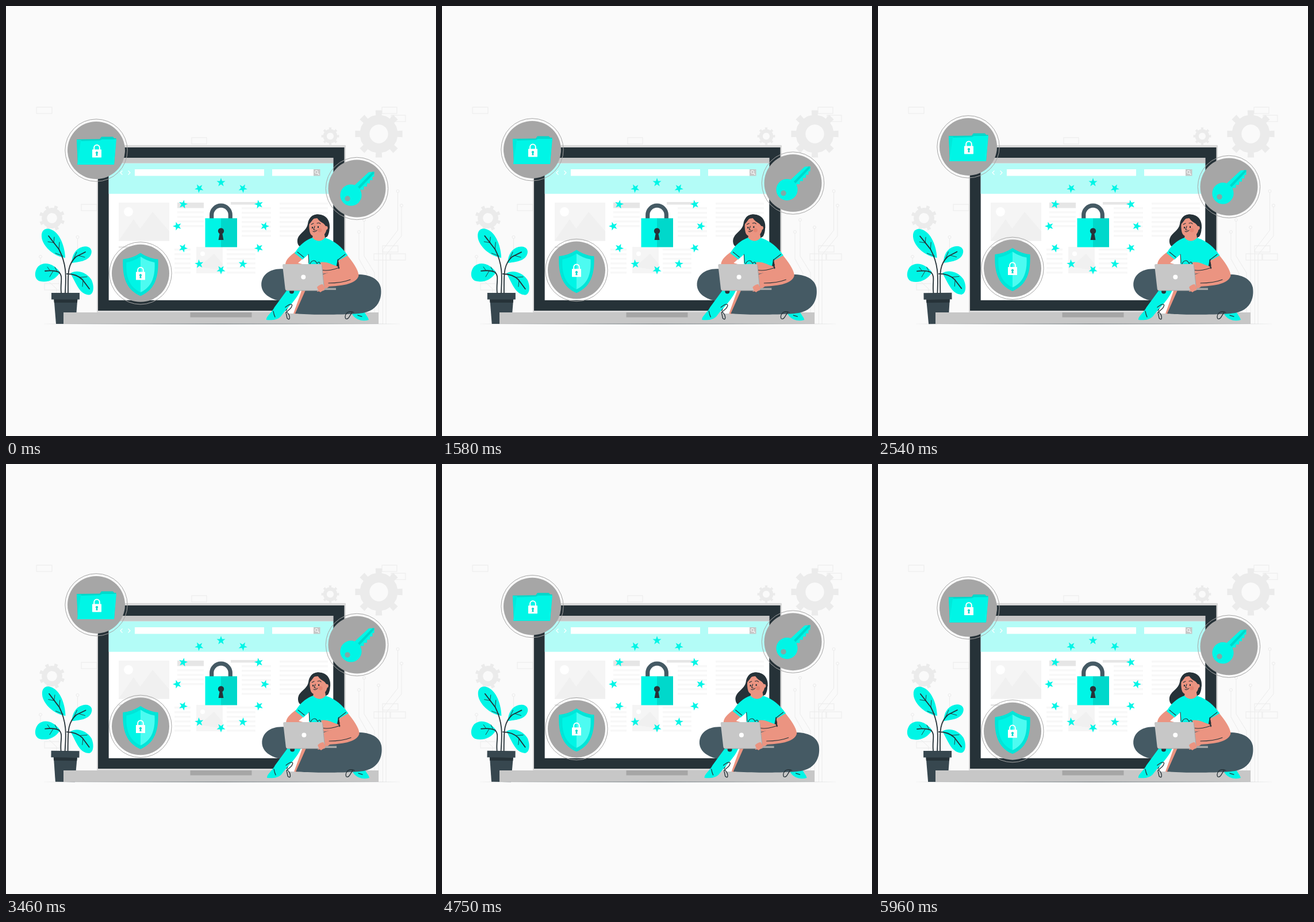
Recreate the animation shown at these times as an HTML page. Size 748x748 px, loop 6 s.

```html
<!DOCTYPE html>
<html lang="en">
<head>
<meta charset="utf-8">
<title>Data protection</title>
<style>
html, body { margin: 0; width: 100%; height: 100%; overflow: hidden; background: #fafafa; }
svg { display: block; width: 100vw; height: 100vh; }
.cy { fill: #00f5e6 } .cd { fill: #00d8cb } .dk { fill: #263238 } .sl { fill: #455a64 }
.gr { fill: #c7c7c7 } .mg { fill: #a6a6a6 } .sk { fill: #eb9481 } .wh { fill: #fff }
.ln { fill: none; stroke: #263238; stroke-linecap: round; stroke-linejoin: round }
.bg { fill: none; stroke: #ebebeb }
</style>
</head>
<body>
<svg viewBox="0 0 748 748">
  <defs>
    <g id="badge">
      <circle r="54.2" fill="none" stroke="#a6a6a6"/>
      <circle r="50" class="mg"/>
    </g>
    <g id="padlock">
      <path d="M-4.8-4V-8a4.8 4.8 0 0 1 9.6 0V-4" fill="none" stroke="#fff" stroke-width="2"/>
      <rect x="-8" y="-5" width="16" height="14" rx=".6" class="wh"/>
      <path d="M-1 2.5a2 2 0 1 1 2 0l.7 3.5h-3.4z" class="cd"/>
    </g>
  </defs>

  <g id="backdrop">
    <g id="boxes" class="bg"></g>
    <g id="gears" fill="#ebebeb" fill-rule="evenodd"></g>
    <g id="circuits" class="bg"></g>
  </g>

  <g id="plant">
    <path d="M83.500 510h40.800l-3.300 43h-34z" fill="#37474f"/>
    <rect x="79" y="499" width="49" height="11.500" fill="#37474f"/>
    <path class="dk" d="M83.300 510.500h41l-.4 5.500h-40.200z"/>
    <g class="cy">
      <path d="M103 438C86 436 67 422 62.500 405C60 393 65 387 74 387.500C91 390 102 414 103 438Z"/>
      <path d="M114 447C115 433 121 422 133 419C145 416 152 424 147.500 433C142 444 128 445 114 447Z"/>
      <path d="M94 463C86 477 71 482 58 478.500C49 475 48.500 462 56 453C67 443 84 449 94 463Z"/>
      <path d="M112 465C123 458 140 463 148.500 476C154 487 153 501 145 502.500C128 502 123 484 112 465Z"/>
    </g>
    <g class="ln" stroke-width="1.800">
      <path d="M96 499C94 481 100 470 92 463Q83 459 68 461M103 499C104 475 107 452 92 423L74 400M108 499C108 468 106 450 122 436L138 428M106 466Q123 466 133 476L145 492"/>
      <path stroke-width=".9" d="M92 423l1-12M84 412l-11-2M83 411l1-9M99 435l-13-5M118 439l5-11M126 434l11 3M77 461l-5-7M82 461l-6 10M89 462l-4-8M129 472l12-1M134 477l-1 11"/>
    </g>
  </g>

  <g id="computer">
    <rect x="158" y="242" width="433" height="291" rx="1" fill="#d9d9d9"/>
    <rect x="160" y="246" width="428.500" height="284" class="dk"/>
    <rect x="178.700" y="264" width="390.600" height="247.800" class="wh"/>
    <rect x="178.700" y="264" width="390.600" height="9.700" class="gr"/>
    <rect x="178.700" y="273.700" width="390.600" height="53" fill="#b3fcf7"/>
    <path d="M202.500 286.500l-3.500 3.500l3.500 3.500M212.500 286.500l3.500 3.500l-3.500 3.500" fill="none" stroke="#fff" stroke-width="1.200"/>
    <path class="wh" d="M224 284h225v11.500H224zM463 284h72v11.500H463z"/>
    <rect x="535" y="284" width="11.500" height="11.500" fill="#c7c7c7"/>
    <path d="M542 291l2.500 2.500" stroke="#fff" stroke-width="1.300"/>
    <circle cx="540" cy="288.800" r="2.600" fill="none" stroke="#fff"/>
    <g id="page" fill="#f8f8f8">
      <rect x="196" y="342" width="88" height="67" fill="#f5f5f5"/>
      <circle cx="213" cy="358" r="8" class="wh"/>
      <path d="M196 408L222 371L248 408zM230 392L255 358L284 392V408H215z" fill="#f0f0f0"/>
      <rect x="331" y="419" width="46" height="46" fill="#f5f5f5"/>
      <circle cx="342" cy="431" r="4" class="wh"/>
      <path d="M336 454L362 431L377 449V460z" fill="#f0f0f0"/>
      <path d="M298 342h46v9.500h-46zM391 341h48v4.500h-48zM196 418h46v3h-46z" fill="#e6e6e6"/>
    </g>
    <rect x="100" y="533" width="548" height="20" class="gr"/>
    <path d="M320.500 533h107v8.500h-107z" class="mg"/>
  </g>
  <path d="M55 553L374 552.300L695 553L374 553.700Z" fill="#8c9396"/>

  <g id="lock">
    <g id="stars" class="cy"></g>
    <path d="M357.700 370V363.500a16.300 16.300 0 0 1 32.600 0V370" fill="none" stroke="#455a64" stroke-width="7.200"/>
    <path class="cy" d="M346.500 369.300H374V419.500H346.500z"/>
    <path class="cd" d="M374 369.300H402V419.500H374z"/>
    <path class="dk" d="M371.600 396a5.200 5.200 0 1 1 4.800 0l2 11h-8.800z"/>
  </g>

  <g id="folder">
    <use href="#badge" x="157" y="251"/>
    <path class="cd" d="M123 232L163 231.500L166 227.500H186L188 230H191.500L188 276H125z"/>
    <path class="cy" d="M130 235L163 234L167 232H192L188 276H124z"/>
    <path class="cy" d="M123 233H131L125 275z" opacity=".6"/>
    <use href="#padlock" x="158" y="254.500"/>
  </g>

  <g id="shield">
    <use href="#badge" x="234" y="464.800"/>
    <path d="M234 429.500Q248 439 264.500 440.500C266 473 258 494 234 504.500C210 494 202 473 203.500 440.500Q220 439 234 429.500Z" fill="#00e5d8"/>
    <path class="cy" d="M234 436Q222 444 209.500 446C208 472 215 489 234 498Z"/>
    <path d="M234 436Q246 444 258.500 446C260 472 253 489 234 498Z" fill="#4dfbf1"/>
    <use href="#padlock" x="234" y="467.500"/>
  </g>

  <g id="key">
    <use href="#badge" x="610.500" y="317.500"/>
    <path class="cy" d="M604 314L631 289L640.500 288.500V297H637.500V303H633V308.500H628V314H622.500V319.500H617.500L611 325z"/>
    <path class="cd" d="M608 319L637.500 288.600H640.500V291L612 321z"/>
    <circle cx="600" cy="329" r="18.600" class="cy"/>
    <circle cx="594" cy="335" r="4.700" fill="#80a9a7"/>
  </g>

  <g id="woman">
    <path class="dk" d="M541 362.500C531 363 526 371 525 379C523 393 505 396 507 411C508 419 514 421 522 417L540 412L559 401C567 388 562 363 541 362.500Z"/>
    <path class="sk" d="M503 428C495 434 487 440 486 449C488 456 505 460 520 460L523 451L508 447L517 439Z"/>
    <path class="sl" d="M484 457.500C458 455 443 469 444.300 487C446 503 464 512 484 514L499 499L560 500V462z"/>
    <path class="wh" d="M508 490L523 492L504 535L487 535Q489 523 508 490z"/>
    <path class="cy" d="M489 494H512C506 511 488 526 478 540C471 547 461 546.500 453 546C452 540 462 534 467 524Z"/>
    <path class="sk" d="M515 493L522 493L505 536L500 535z"/>
    <circle cx="497" cy="496.500" r="4" class="dk"/>
    <path class="cy" d="M600 533L622 529C625 537 630 541 631 546C620 549 611 546 605 540Z"/>
    <path class="sl" d="M522 492L503 535C535 538 602 537 621 534C645 530 655 511 652 490C649 473 629 466 609 467L560 488Z"/>
    <g class="ln" stroke-width="1.300">
      <path d="M486 524C496 516 501 518 495 526L487 533L489 543C494 549 496 539 488 532M465 531q1 6 3 10M605 533C592 528 588 540 591 544C596 546 598 538 602 533M612 538l7 2"/>
    </g>
    <path class="cy" d="M533 403C519 408 509 418 502 430L516 441L526 432V452L574 457L577 440L582 446L594.500 434C584 419 572 409 557 404L551 401Z"/>
    <path class="sk" d="M535 394L553 392L555 403C549 411 539 410 533 403Z"/>
    <path class="sk" d="M578 443L594 434C602 444 613.500 459 613.500 469C610 485 578 487 562 488L553 495L541 497L545 485L549 468L580 457Z"/>
    <path class="sk" d="M547 446C559 444 566 450 577 453L580 461L550 466z"/>
    <path class="ln" stroke-width="1.100" d="M507 428l11 9M590 432l-13 10M526 432l1 15M577 443l2 8M549 459C559 462 571 458 580 455M561 482C574 482 589 480 599 476M528 450c4-9 10-9 13-2c4-6 7 0 4 4"/>
    <path class="sk" d="M528 376C531 369 546 366 555 373C560 380 559 392 553 398C547 403 533 403 529.500 396C527 390 527 382 528 376Z"/>
    <path class="dk" d="M540 366C535 368 532 375 527 380C526 367 534 362.500 543 362.500C557 363 564 373 563 386L558.500 397C559 387 556 380 550 377C545 374 542 371 540 366Z"/>
    <circle cx="556.500" cy="386" r="3.200" class="sk"/>
    <g class="ln" stroke-width="1.100">
      <path d="M531 380l4-2M541 378q4-2 6 1M537 383l-2 6l3 1M534 392q4 2 7-2"/>
    </g>
    <path class="dk" d="M532 384h2v3h-2zM542 383h2v3h-2z"/>
    <circle cx="546" cy="390" r="3.500" fill="#de735f" opacity=".45"/>
    <path class="mg" d="M544 490.500H574V494H544z"/>
    <path class="gr" d="M483 449H547Q549 449 549.500 451L553.500 492Q553.500 495 550 495H489Q486 495 485.700 492L481 451Q481 449 483 449Z"/>
    <path d="M549.500 451L553.500 492Q553.500 495 550 495H489" fill="none" stroke="#a6a6a6"/>
    <circle cx="517.300" cy="471.500" r="4" class="wh"/>
    <path class="sk" d="M541 489q5-5 10-5l4 8l-8 6q-4-2-6-9z"/>
  </g>
</svg>
<script>
const byId = id => document.getElementById(id);
const polar = (r, deg) => {
  const a = deg * Math.PI / 180;
  return [r * Math.sin(a), -r * Math.cos(a)].map(v => v.toFixed(2)).join(' ');
};
const fillWith = (id, markup) => byId(id).insertAdjacentHTML('beforeend', markup);

function gear(x, y, r, turn) {
  const points = [];
  for (let a = 0; a < 360; a += 45) {
    points.push(polar(r * .79, a - 9), polar(r, a - 8), polar(r, a + 8), polar(r * .79, a + 9), polar(r * .8, a + 22.5));
  }
  const h = r * .39;
  return `<path transform="translate(${x} ${y}) rotate(${turn})" d="M${points.join('L')}ZM0 ${-h}A${h} ${h} 0 1 0 .01 ${-h}Z"/>`;
}

function star(angle) {
  const points = Array.from({ length: 10 }, (_, i) => polar(i % 2 ? 3.2 : 8, i * 36));
  return `<path transform="translate(374 383) rotate(${angle}) translate(0 -76)" d="M${points.join('L')}Z"/>`;
}

function circuit(x, y, rest) {
  return `<circle cx="${x}" cy="${y}" r="2.5"/><path d="M${x} ${y + 2.5}${rest}"/>`;
}

function rows(x, width, from, to, step) {
  let markup = '';
  for (let y = from; y <= to; y += step) markup += `<rect x="${x}" y="${y}" width="${width}" height="3.5"/>`;
  return markup;
}

fillWith('boxes', [[53, 176, 27], [654, 176, 26], [670, 190, 25], [323, 229, 26], [131, 345, 27],
  [640, 431, 28], [669, 431, 26], [655, 417, 27], [67, 483, 27]]
  .map(([x, y, w]) => `<rect x="${x}" y="${y}" width="${w}" height="11"/>`).join(''));
fillWith('gears', gear(648.5, 222.5, 41.5, 0) + gear(564, 226.5, 15.5, 0) + gear(80, 369, 22.5, 20));
fillWith('circuits', circuit(681.5, 322, 'V390L655.500 424V553') + circuit(688, 347, 'V400L661 433V553') +
  circuit(614, 393, 'V440L628 465V553') + circuit(623, 372, 'V435L641 464V553') +
  circuit(648, 385, 'V553') + circuit(60, 436, 'V466L88 492V553') + circuit(124.5, 402, 'V430L108 452V553'));
fillWith('page', rows(298, 46, 357, 382, 8) + rows(410, 51, 350, 398, 8) + rows(476, 84, 342, 398, 8) +
  rows(293, 28, 422, 464, 8) + rows(384, 50, 422, 464, 8));
fillWith('stars', Array.from({ length: 12 }, (_, i) => star(i * 30)).join(''));

const phase = (t, period) => t % period / period;
const rise = (t, period) => -10 * (1 - Math.abs(2 * phase(t, period) - 1));

function sway(t, period) {
  const p = phase(t, period);
  return p < .25 ? p * 4 : p < .75 ? 2 - p * 4 : p * 4 - 4;
}

// cubic-bezier(0, 0, .58, 1)
function easeOut(x) {
  let lo = 0, hi = 1;
  for (let i = 0; i < 20; i++) {
    const s = (lo + hi) / 2;
    if (1.74 * (1 - s) * s * s + s ** 3 < x) lo = s; else hi = s;
  }
  return 3 * lo * lo - 2 * lo ** 3;
}

const shakeStops = [0, -1, 2, -4, 4, -4, 4, -4, 2, -1, 0];
function shake(t, period) {
  const p = phase(t, period) * 10, i = Math.floor(p);
  return shakeStops[i] + (shakeStops[i + 1] - shakeStops[i]) * easeOut(p - i);
}

const move = (id, transform) => byId(id).setAttribute('transform', transform);

function draw(ms) {
  // 24 pictures per second
  const t = Math.floor(ms % 6000 * .024 + .25) / 24;
  move('folder', `translate(0 ${rise(t, 1.5)})`);
  move('key', `translate(0 ${rise(t, 3)})`);
  move('shield', `translate(0 ${rise(t, 6)})`);
  move('plant', `rotate(${sway(t, 1.5)} 101.500 470)`);
  move('woman', `translate(${shake(t, 3)} 0)`);
}

const start = performance.now();
function tick() {
  draw(performance.now() - start);
  requestAnimationFrame(tick);
}
tick();
</script>
</body>
</html>
```
